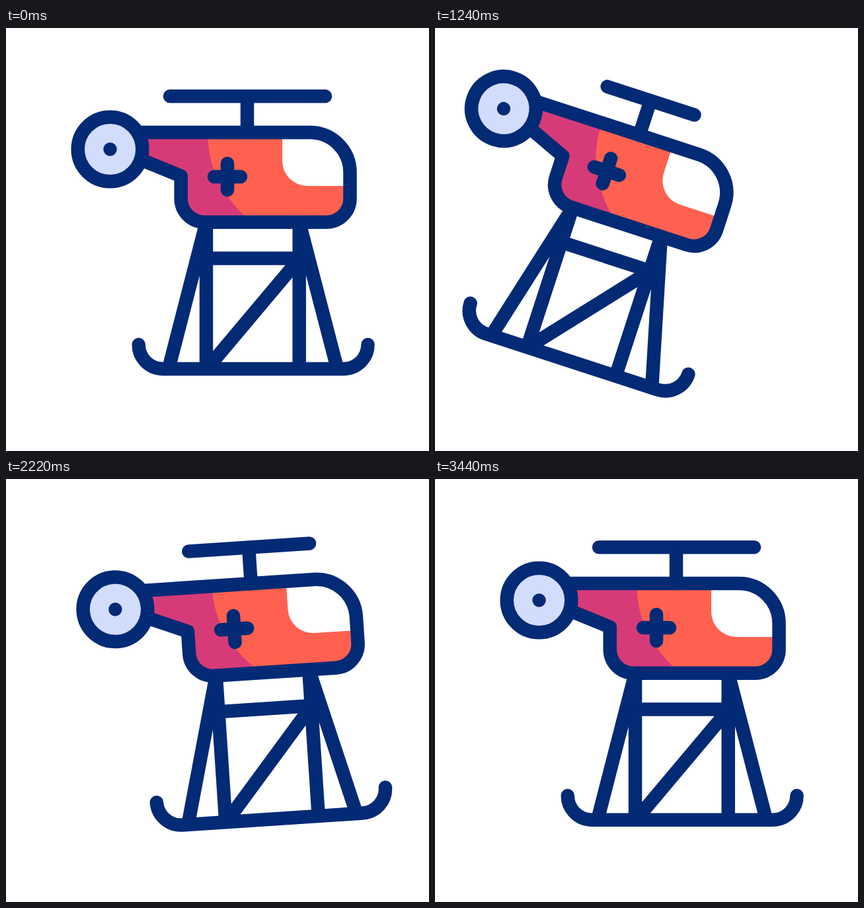
An HTML page for the animation above (3.62 s loop, 640 by 640 pixels).

```html
<!DOCTYPE html>
<html lang="en">
<head>
<meta charset="utf-8">
<title>Rescue helicopter</title>
<style>
  html, body { margin: 0; width: 100%; height: 100%; overflow: hidden; background: #fff; }
  svg { display: block; width: 100vw; height: 100vh; }
  .line { fill: none; stroke: #032a75; stroke-width: 20.5; stroke-linecap: round; stroke-linejoin: round; }
</style>
</head>
<body>
<svg viewBox="0 0 640 640">
  <defs>
    <path id="hull" d="M190 158H460A60.5 60.5 0 0 1 520.5 218.5V258A35.7 35.7 0 0 1 484.8 293.7H300.4A35.7 35.7 0 0 1 264.7 258V224L190 193.4"/>
    <clipPath id="inside"><use href="#hull"/></clipPath>
  </defs>
  <g id="craft">
    <g clip-path="url(#inside)">
      <path fill="#ff6150" d="M180 150H530V300H180z"/>
      <path fill="#d63b78" d="M180 150H305.5V164C306 210 326 254 370 293V300H180z"/>
      <path fill="#fff" d="M418 150V201A38 38 0 0 0 456 239H530V150z"/>
    </g>
    <g class="line">
      <path d="M303 515.5V294L246 515.5M443.7 515.5V294L501.3 515.5M303 348.5H443.7M444.5 348.5L304 515.5"/>
      <path d="M200.7 479A37 36.7 0 0 0 237.7 515.7H510.5A37 36.7 0 0 0 547.5 479"/>
      <use href="#hull"/>
      <path d="M365 103.2V158M315 225H355M335 205V245"/>
      <path id="blade"/>
      <circle cx="157.5" cy="183.5" r="48.8" fill="#d2dcfd"/>
    </g>
    <circle cx="157.5" cy="183.5" r="10.2" fill="#032a75"/>
  </g>
</svg>
<script>
const LOOP = 3620, STEP = 20;
const FIRST = 10, SPIN = 9.99, SPINS = 16;
const craft = document.getElementById('craft');
const blade = document.getElementById('blade');

// Turning points of the flight, eased in and out between them
const poses = [
  { at: FIRST, shift: 0, tilt: 0 },
  { at: 29, shift: -67.3, tilt: 15.3 },
  { at: 60, shift: -82.2, tilt: 18.3 },
  { at: 95, shift: 19, tilt: -11.3 },
  { at: 133, shift: -1.5, tilt: 8.4 },
  { at: 140, shift: -1.5, tilt: 8.4 },
  { at: 158, shift: -1, tilt: -0.3 },
  { at: 172, shift: 0, tilt: 0 }
];

const clamp = u => Math.min(1, Math.max(0, u));
const ease = u => u * u * (3 - 2 * u);
const mix = (a, b, u) => a + (b - a) * u;

function poseAt(n) {
  const i = Math.max(1, poses.findIndex(p => p.at > n));
  const [a, b] = n < poses.at(-1).at ? [poses[i - 1], poses[i]] : poses.slice(-2);
  const u = ease(clamp((n - a.at) / (b.at - a.at)));
  return { shift: mix(a.shift, b.shift, u), tilt: mix(a.tilt, b.tilt, u) };
}

// The rotor narrows to a dot and widens again on every spin
function rotorScale(n) {
  const turns = SPINS * clamp((n - FIRST) / (SPIN * SPINS));
  return Math.abs(1 - 2 * (turns % 1));
}

function draw(time) {
  const n = Math.floor((time % LOOP) / STEP);
  const { shift, tilt } = poseAt(n);
  const half = 117.5 * rotorScale(n);
  craft.setAttribute('transform', `translate(${shift}) rotate(${tilt} 365 240)`);
  blade.setAttribute('d', `M${365.5 - half} 103.2H${365.5 + half}`);
}

let start;
function tick(now) {
  start ??= now;
  draw(now - start);
  requestAnimationFrame(tick);
}
draw(0);
requestAnimationFrame(tick);
</script>
</body>
</html>
```
